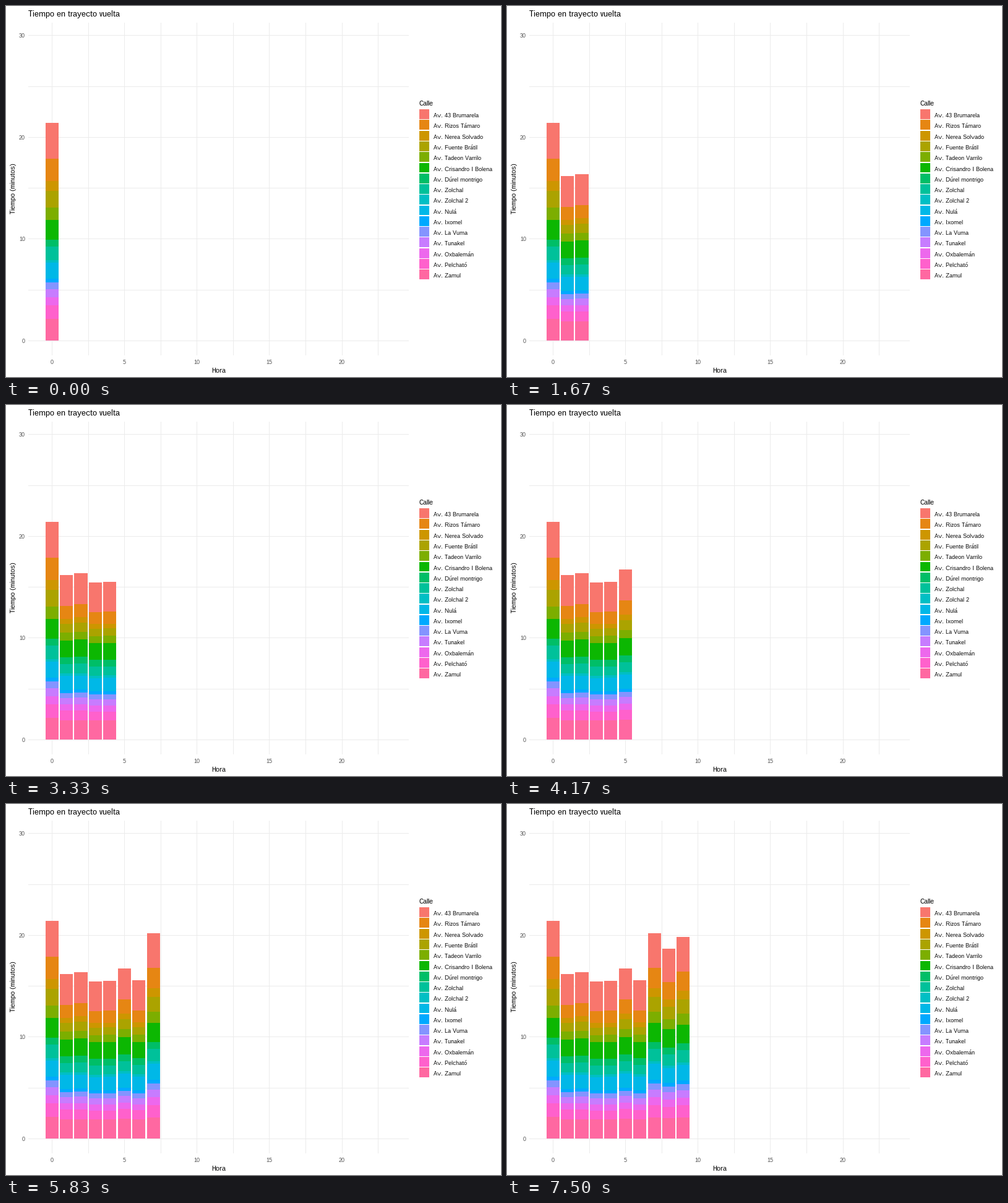
Animation, 800 px wide and 600 px high, one loop 8 s. Source, as a matplotlib script:

```python
from itertools import accumulate

import matplotlib.pyplot as plt
from matplotlib.animation import FuncAnimation
from matplotlib.collections import PatchCollection
from matplotlib.patches import Rectangle

W, H, DPI = 800, 600, 100
LOOP, STEP = 8000, 40
BASE = 541
GRID, GREY = "#EBEBEB", "#4D4D4D"

# Name, colour, share of a quiet hour's bar and what a busy hour adds, in px.
STREETS = [
    ("Av. 43 Brumarela", "#F8766D", 49, 7),
    ("Av. Rizos Támaro", "#E68613", 20, 12),
    ("Av. Nerea Solvado", "#CD9600", 8, 6),
    ("Av. Fuente Brátil", "#ABA300", 13, 11),
    ("Av. Tadeon Varrilo", "#7CAE00", 12, 6),
    ("Av. Crisandro I Bolena", "#0CB702", 27, 4),
    ("Av. Dúrel montrigo", "#00BE67", 11, 0),
    ("Av. Zolchal", "#00C19A", 15, 5),
    ("Av. Zolchal 2", "#00BFC4", 4, 0),
    ("Av. Nulá", "#00B8E7", 22, 3),
    ("Av. Ixomel", "#00A9FF", 5, 1),
    ("Av. La Vuma", "#8494FF", 8, 2),
    ("Av. Tunakel", "#C77CFF", 10, 2),
    ("Av. Oxbalemán", "#ED68ED", 10, 3),
    ("Av. Pelcható", "#FF61CC", 15, 5),
    ("Av. Zamul", "#FF68A1", 31, 3),
]
NAMES, COLORS, QUIET, EXTRA = zip(*STREETS)
TOTALS = [352, 266, 269, 254, 255, 275, 256, 332, 307, 326]

plt.rcParams.update({
    "font.family": "Liberation Sans",
    "text.hinting": "native",
    "text.hinting_factor": 1,
    "text.kerning_factor": 6,
})
fig = plt.figure(figsize=(W / DPI, H / DPI), dpi=DPI, facecolor="white")
ax = fig.add_axes([0, 0, 1, 1])
ax.set(xlim=(0, W), ylim=(H, 0))
ax.axis("off")


def box(x0, y0, x1, y1):
    return Rectangle((x0, y0), x1 - x0, y1 - y0)


def add_boxes(boxes, colors):
    return ax.add_collection(PatchCollection(
        boxes, facecolors=colors, linewidths=0, antialiased=False),
        autolim=False)


def label(x, y, text, px, color="black", **kw):
    ax.text(x, y, text, fontsize=px * 72 / DPI, color=color,
            va="baseline", **kw)


def draw_grid():
    cols = [int(74.5 + 58.5625 * i) for i in range(10)]
    rows = [int(541.5 - 82.3 * i) for i in range(7)]
    add_boxes([box(x, 27, x + 1, 565) for x in cols]
              + [box(36, y, 651, y + 1) for y in rows], GRID)
    for i, x in enumerate(cols[::2]):
        label(x, 579, str(5 * i), 9, GREY, ha="center")
    for i, y in enumerate(rows[::2]):
        label(31, y + 4, str(10 * i), 9, GREY, ha="right")


def draw_legend():
    label(668, 161, "Calle", 11)
    tops = [167.62 + 17.28 * i for i in range(len(STREETS))]
    add_boxes([box(668, int(y), 684, int(y + 15.84)) for y in tops], COLORS)
    for y, name in zip(tops, NAMES):
        label(691, int(y) + 13, name, 9)


def draw_bar(hour, total):
    left = 64.05 + 23.425 * hour
    x0, x1 = int(left), int(left + 21.11)
    busy = (total - sum(QUIET)) / sum(EXTRA)
    sizes = [q + busy * e for q, e in zip(QUIET, EXTRA)]
    edges = [round(y) for y in accumulate(sizes, initial=BASE - total)]
    return add_boxes([box(x0, a, x1, b) for a, b in zip(edges, edges[1:])],
                     COLORS)


draw_grid()
draw_legend()
label(36, 17, "Tiempo en trayecto vuelta", 13)
label(343.5, 593, "Hora", 11, ha="center")
label(15, 295.5, "Tiempo (minutos)", 11, ha="center",
      rotation=90, rotation_mode="anchor")
bars = [draw_bar(hour, total) for hour, total in enumerate(TOTALS)]


def update(i):
    # A new hour appears every 5/6 of a second.
    for hour, bar in enumerate(bars):
        start = 10 * round(hour * 250 / 3)
        bar.set_visible(start < (i + 1) * STEP)
    return bars


anim = FuncAnimation(fig, update, frames=LOOP // STEP, interval=STEP,
                     repeat=True, repeat_delay=0)
plt.show()
```
